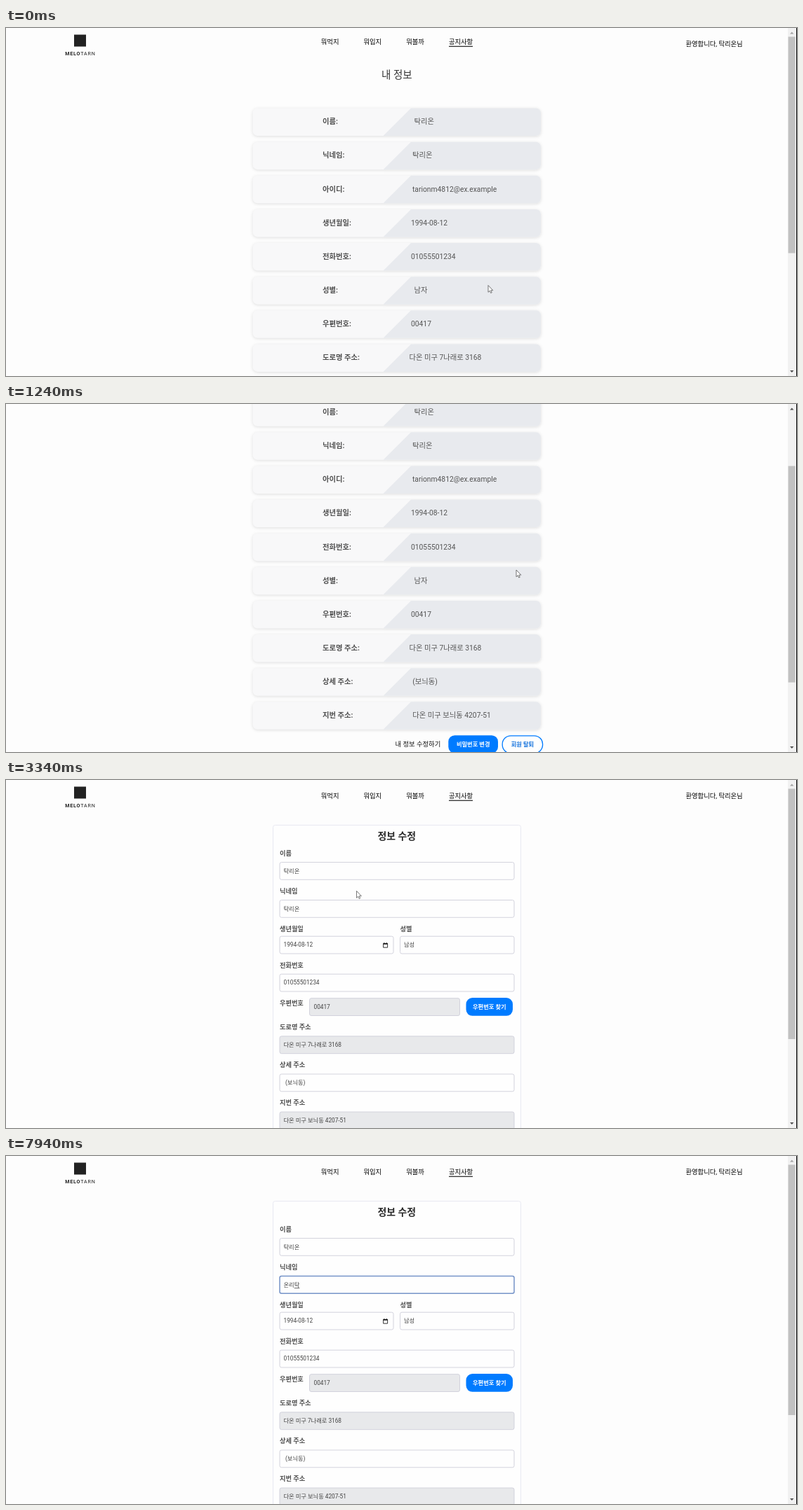
An HTML page that plays this animation: 1127 by 497 pixels, repeating every 8000 ms.

```html
<!DOCTYPE html>
<html lang="ko">
<head>
<meta charset="utf-8">
<style>
html, body { margin: 0; width: 100%; height: 100%; overflow: hidden; background: #fdfdfd; }
svg { display: block; width: 1127px; height: 497px; }
text { font-family: Roboto, 'Noto Sans CJK KR', 'Noto Sans CJK', sans-serif; white-space: pre; }
.cards { filter: drop-shadow(0 1.5px 2px rgba(0, 0, 0, .12)); }
</style>
</head>
<body>
<svg id="stage" viewBox="0 0 1127 497"></svg>
<script>
const LOOP = 8000;
const stage = document.getElementById('stage');
const NAME = '탁리온';
const ROAD = '다온 미구 7나래로 3168';
const LOT = '다온 미구 보늬동 4207-51';
const BLUE = '#007bff';

function el(parent, tag, attrs = {}) {
  const node = document.createElementNS('http://www.w3.org/2000/svg', tag);
  for (const k in attrs) node.setAttribute(k, attrs[k]);
  parent.appendChild(node);
  return node;
}
const set = (node, attrs) => { for (const k in attrs) node.setAttribute(k, attrs[k]); };
const show = (node, on) => node.setAttribute('visibility', on ? 'visible' : 'hidden');
const group = (parent, attrs) => el(parent, 'g', attrs);

// y is the optical middle of the line
function text(parent, str, x, y, size, fill, weight = 400, anchor = 'start') {
  const node = el(parent, 'text', {
    x, y: y + size * .37, 'font-size': size, fill, 'font-weight': weight, 'text-anchor': anchor
  });
  node.textContent = str;
  return node;
}
const box = (parent, x, y, width, height, rx, fill, more = {}) =>
  el(parent, 'rect', { x, y, width, height, rx, fill, ...more });

function header(parent, navY, userY) {
  box(parent, 97, 9.5, 17, 17, 0, '#222');
  const mark = text(parent, '', 105.9, 36.7, 7.1, '#222', 400, 'middle');
  mark.setAttribute('letter-spacing', .85);
  el(mark, 'tspan', { 'font-weight': 700 }).textContent = 'MELO';
  el(mark, 'tspan').textContent = 'TARN';
  ['뭐먹지', '뭐입지', '뭐볼까', '공지사항'].forEach((s, i) =>
    text(parent, s, 448.8 + i * 60.7, navY, 9.3, '#000', 500));
  box(parent, 631, navY + 5.7, 34, 1.2, 0, '#222');
  text(parent, `환영합니다, ${NAME}님`, 968.5, userY, 9.3, '#000');
}

// Profile page
const profile = group(stage);
header(profile, 20, 23);
text(profile, '내 정보', 556.8, 67, 14.5, '#333', 400, 'middle');
const cards = group(profile, { class: 'cards' });
[
  ['이름', NAME, 581.5], ['닉네임', NAME, 579],
  ['아이디', 'tarionm4812@ex.example', 579], ['생년월일', '1994-08-12', 577],
  ['전화번호', '01055501234', 577], ['성별', '남자', 581.5],
  ['우편번호', '00417', 577], ['도로명 주소', ROAD, 574.5],
  ['상세 주소', '(보늬동)', 579.3], ['지번 주소', LOT, 579.3]
].forEach(([label, value, x], i) => {
  const y = 114.5 + i * 48.13;
  box(cards, 351.5, y, 410.5, 39.5, 7, '#f8f8f9');
  el(cards, 'path', { fill: '#e8eaee', d: `M577 ${y}H755a7 7 0 0 1 7 7v25.5a7 7 0 0 1-7 7H537.5Z` });
  text(profile, label + ':', 451, y + 19, 10.3, '#505050', 700);
  text(profile, value, x, y + 19, 10.3, '#555');
});
text(profile, '내 정보 수정하기', 554.5, 608, 9.35, '#111');
const change = group(profile);
const changeBox = box(change, 630.3, 595.5, 70.7, 25.5, 9, BLUE);
text(change, '비밀번호 변경', 665.7, 608, 8.26, '#fff', 700, 'middle');
box(profile, 707.2, 596.1, 57.4, 25, 12, '#fefefe', { stroke: BLUE, 'stroke-width': 1.3 });
text(profile, '회원 탈퇴', 736, 608, 8.26, '#1573dd', 700, 'middle');

// Edit form
const form = group(stage);
header(form, 23, 23);
box(form, 380.5, 64.5, 353, 500, 3, '#fefefe', { stroke: '#e8e9f2' });
text(form, '정보 수정', 556.8, 80.3, 13.9, '#2a2a2a', 700, 'middle');

function field(x, y, width, value, locked, pad = 6) {
  const rect = box(form, x + .5, y + .5, width - 1, 24.8, 2.5, locked ? '#e8e9eb' : '#fefefe',
    { stroke: '#cfcfda', 'stroke-width': .9 });
  return [rect, text(form, value, x + pad, y + 12.6, 8.26, '#444')];
}
const label = (str, x, y) => text(form, str, x, y, 9.2, '#505050', 700);

label('이름', 390, 104.5);
field(389.5, 117, 335, NAME);
label('닉네임', 390, 158.5);
const [nickBox, nickText] = field(389.5, 171, 335, NAME);
label('생년월일', 390, 212.5);
field(389.5, 222.7, 163, '1994-08-12');
el(form, 'path', { d: 'M537.6 233.6h6v5.6h-6ZM538.9 232v1.6M542.3 232v1.6', fill: 'none', stroke: '#222', 'stroke-width': .9 });
box(form, 537.5, 233, 6.2, 1.8, 0, '#222');
label('성별', 561.5, 212.5);
field(561, 222.7, 163.5, '남성');
label('전화번호', 390, 264.5);
field(389.5, 276.7, 335, '01055501234');
label('우편번호', 390, 318.5);
field(432, 311.2, 215, '00417', true, 6.5);
box(form, 655.5, 311, 66.5, 25.8, 9, BLUE);
text(form, '우편번호 찾기', 688.8, 323.7, 8.26, '#fff', 700, 'middle');
label('도로명 주소', 390, 352.7);
field(389.5, 365.4, 335, ROAD, true);
label('상세 주소', 390, 406.7);
field(389.5, 419.5, 335, '(보늬동)', false, 8.5);
label('지번 주소', 390, 461);
field(389.5, 473.5, 335, LOT, true);

const ADV = 8.26 * .92;
const mark = box(form, 395.5, 178, ADV * 3, 11.5, 0, '#3875d7', { 'fill-opacity': .85 });
form.insertBefore(mark, nickText);
const under = box(form, 0, 188.2, ADV, .9, 0, '#555');
const caret = box(form, 0, 178.5, .8, 10.5, 0, '#222');

// Scrollbar
box(stage, 1114, 0, 12, 497, 0, '#f1f1f1');
box(stage, 1126, 0, 1, 497, 0, '#000');
const thumb = box(stage, 1114.5, 12.5, 10, 309, 0, '#c1c1c1');
const upArrow = el(stage, 'path', { d: 'M1117 8.5h5.4l-2.7-3Z' });
el(stage, 'path', { d: 'M1117 489h5.4l-2.7 3Z', fill: '#505050' });

// Pointers
const cursor = group(stage);
const pen = { fill: '#fff', stroke: '#555', 'stroke-width': .8, 'stroke-linejoin': 'round' };
const arrow = el(cursor, 'path', { d: 'M0 0V9.8L2.2 7.8L3.7 11L5.2 10.3L3.8 7.2H6.8Z', ...pen });
const hand = el(cursor, 'path', {
  d: 'M-1 1Q0-.6 1 1V5L4.5 5.7Q5.6 6 5.5 7.5L4.7 12.5H-.7L-3.7 8.3Q-3.5 6.6-1 8.3Z', ...pen, 'stroke-width': .6
});
const beam = el(cursor, 'path', { d: 'M-2-5.5H2M0-5.5V5.5M-2 5.5H2', fill: 'none', stroke: '#333', 'stroke-width': .9 });

const clamp = v => Math.min(1, Math.max(0, v));
const mix = (a, b, k) => a + (b - a) * k;

// Smoothly interpolates rows of [time, ...values]
function track(rows, t) {
  const i = rows.findIndex(r => r[0] > t);
  if (i < 0) return rows[rows.length - 1].slice(1);
  if (!i) return rows[0].slice(1);
  const a = rows[i - 1], b = rows[i];
  const k = (t - a[0]) / (b[0] - a[0]), e = k * k * (3 - 2 * k);
  return a.slice(1).map((v, n) => mix(v, b[n + 1], e));
}

const MOVES = [
  [40, 687, 367.5], [570, 727, 245], [840, 727, 245], [960, 727, 237], [1670, 727, 237],
  [2000, 673, 459.5], [2200, 673, 459.5], [3000, 506, 166], [3340, 499.5, 158.5],
  [3840, 476, 176], [4170, 460, 184]
];
const SCROLL = [[960, 0], [1000, 1.1], [1240, 122.3], [1640, 146.6]];
const TYPED = [
  [4940, ''], [5940, 'ㅇ'], [6140, '오'], [6340, '온'], [6420, '온ㄹ'], [6500, '온리'],
  [6700, '온리ㅌ'], [6940, '온리타'], [7400, '온리탁']
];
const PAGE = 2230, FOCUS = 4170;

function render(t) {
  const onForm = t >= PAGE;
  profile.style.display = onForm ? 'none' : '';
  form.style.display = onForm ? '' : 'none';

  const [y] = onForm ? [0] : track(SCROLL, t);
  profile.setAttribute('transform', `translate(0 ${-y})`);
  set(thumb, { y: 12.5 + y * .622, height: onForm ? 357.5 : 309 });
  upArrow.setAttribute('fill', y > 0 ? '#505050' : '#a3a3a3');

  const h = clamp((t - 1850) / 150);
  const s = 1 + .035 * h;
  set(change, { transform: `translate(665.7 608.2) scale(${s}) translate(-665.7 -608.2)` });
  changeBox.setAttribute('fill', `rgb(0,${mix(123, 86, h)},${mix(255, 179, h)})`);
  changeBox.style.filter = h ? `drop-shadow(0 2px 2px rgba(0,0,0,${.2 * h}))` : '';

  const focus = t >= FOCUS;
  set(nickBox, { stroke: focus ? '#7593c8' : '#cfcfda', 'stroke-width': focus ? 1.5 : .9 });
  const key = TYPED.filter(k => k[0] <= t).pop();
  const value = key ? key[1] : NAME;
  const selected = t >= 4340 && !key;
  nickText.textContent = value;
  nickText.setAttribute('fill', selected ? '#fff' : '#444');
  const last = 395.5 + ADV * (value.length - 1);
  set(under, { x: last });
  set(caret, { x: last + ADV + .3 });
  mark.style.display = selected ? '' : 'none';
  under.style.display = key && value ? '' : 'none';
  const blink = t >= 5540 && (!value || t - key[0] < 540);
  caret.style.display = blink ? '' : 'none';

  const [cx, cy] = track(MOVES, t);
  cursor.setAttribute('transform', `translate(${cx} ${cy})`);
  const isHand = t >= 1850 && !onForm;
  const isBeam = onForm && t > 3340 && cy > 171;
  show(hand, isHand);
  show(beam, isBeam && t < 5000);
  show(arrow, !isHand && !isBeam);
}

const start = performance.now();
function tick() {
  render((performance.now() - start) % LOOP);
  requestAnimationFrame(tick);
}
tick();
</script>
</body>
</html>
```
